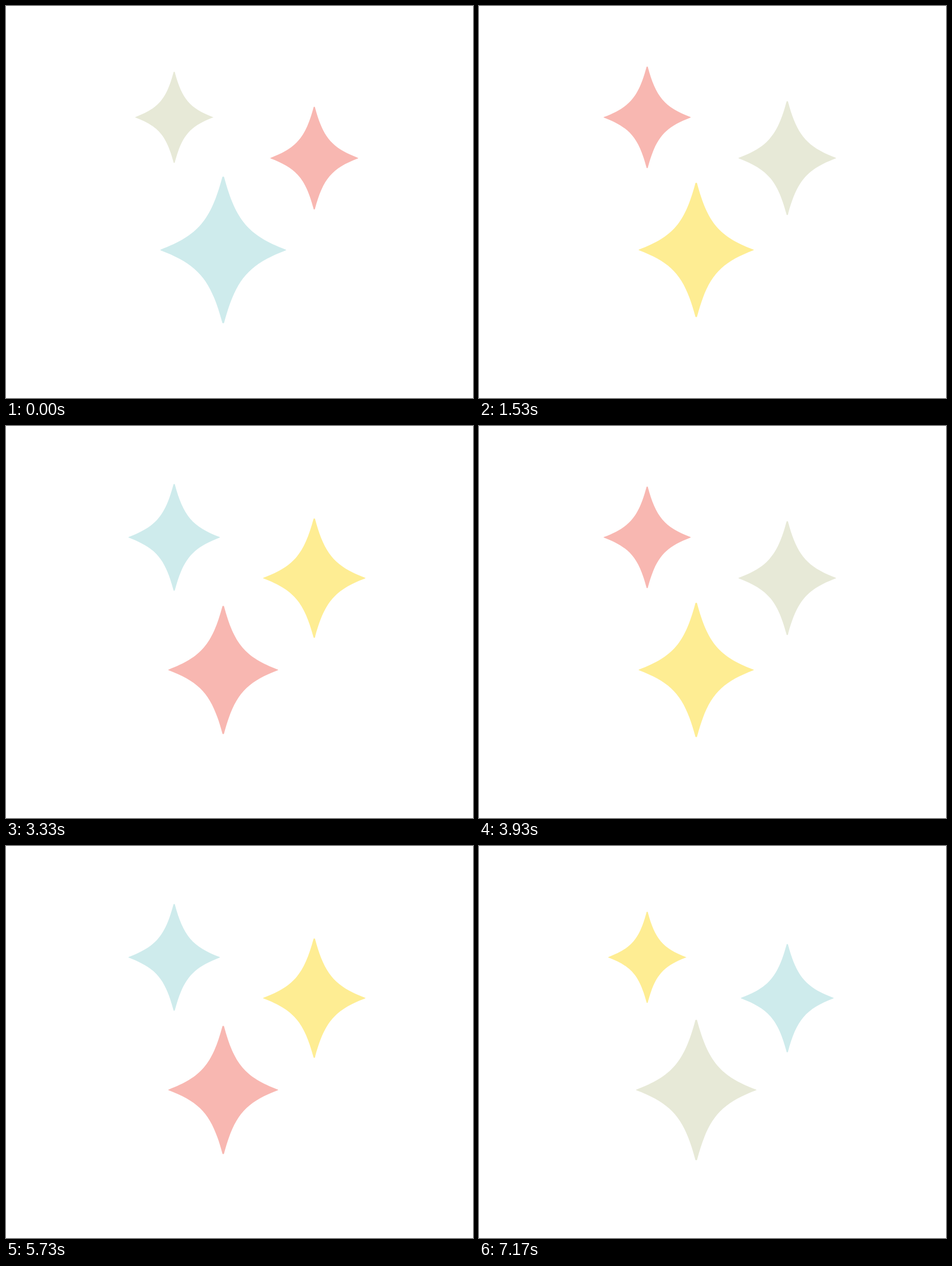
Write an HTML page that moves like this. It is 817 by 685 pixels and loops after 7.21 s.

```html
<!DOCTYPE html>
<html lang="en">
<head>
<meta charset="utf-8">
<title>Twinkling stars</title>
<style>
  html, body { margin: 0; width: 100%; height: 100%; overflow: hidden; background: #fff; }
  svg { display: block; width: 817px; height: 685px; }
</style>
</head>
<body>
<svg viewBox="0 0 817 685">
  <defs>
    <path id="star" d="M1.5 -127.5 C22 -51.2 44 -25.6 109.5 -.6 Q110.5 0 109.5 .6
      C44 25.6 22 51.2 1.5 127.5 Q0 129 -1.5 127.5
      C-22 51.2 -44 25.6 -109.5 .6 Q-110.5 0 -109.5 -.6
      C-44 -25.6 -22 -51.2 -1.5 -127.5 Q0 -129 1.5 -127.5Z"/>
  </defs>
</svg>
<script>
const LOOP = 7210;
const STEPS = [0, 70, 100, 130, 170]; // five drawn poses per 200 ms
const LAST = 179;
const COLORS = ['#e7e9d7', '#ceebec', '#f8b7b1', '#feed93'];

// size at rest, size at full swell, place in the colour cycle
const stars = [
  { x: 294.2, y: 194.5, from: 0.622, to: 0.798, shift: 0, early: true },
  { x: 539.3, y: 265.8, from: 0.7, to: 0.89, shift: 2 },
  { x: 380, y: 426.3, from: 1, to: 0.79, shift: 1 },
];

const svg = document.querySelector('svg');
for (const s of stars) {
  s.el = document.createElementNS(svg.namespaceURI, 'use');
  s.el.setAttribute('href', '#star');
  svg.append(s.el);
}

function poseAt(ms) {
  const rest = ms % 200;
  const n = STEPS.filter(at => at <= rest).length - 1;
  return Math.min(LAST, Math.floor(ms / 200) * 5 + n);
}

// triangle wave of ten poses
const pulse = n => 1 - Math.abs((n % 10) - 5) / 5;

// this star's last fall in each round takes four poses instead of five
function swell(star, n) {
  const k = n % 60;
  return star.early && k > 55 ? (59 - k) / 4 : pulse(n);
}

function draw(ms) {
  const n = poseAt(ms);
  for (const s of stars) {
    const size = s.from + (s.to - s.from) * swell(s, n);
    s.el.setAttribute('transform', `translate(${s.x} ${s.y}) scale(${size})`);
    s.el.setAttribute('fill', COLORS[(Math.floor(n / 15) + s.shift) % 4]);
  }
}

const start = performance.now();
function tick() {
  draw((performance.now() - start) % LOOP);
  requestAnimationFrame(tick);
}
tick();
</script>
</body>
</html>
```
